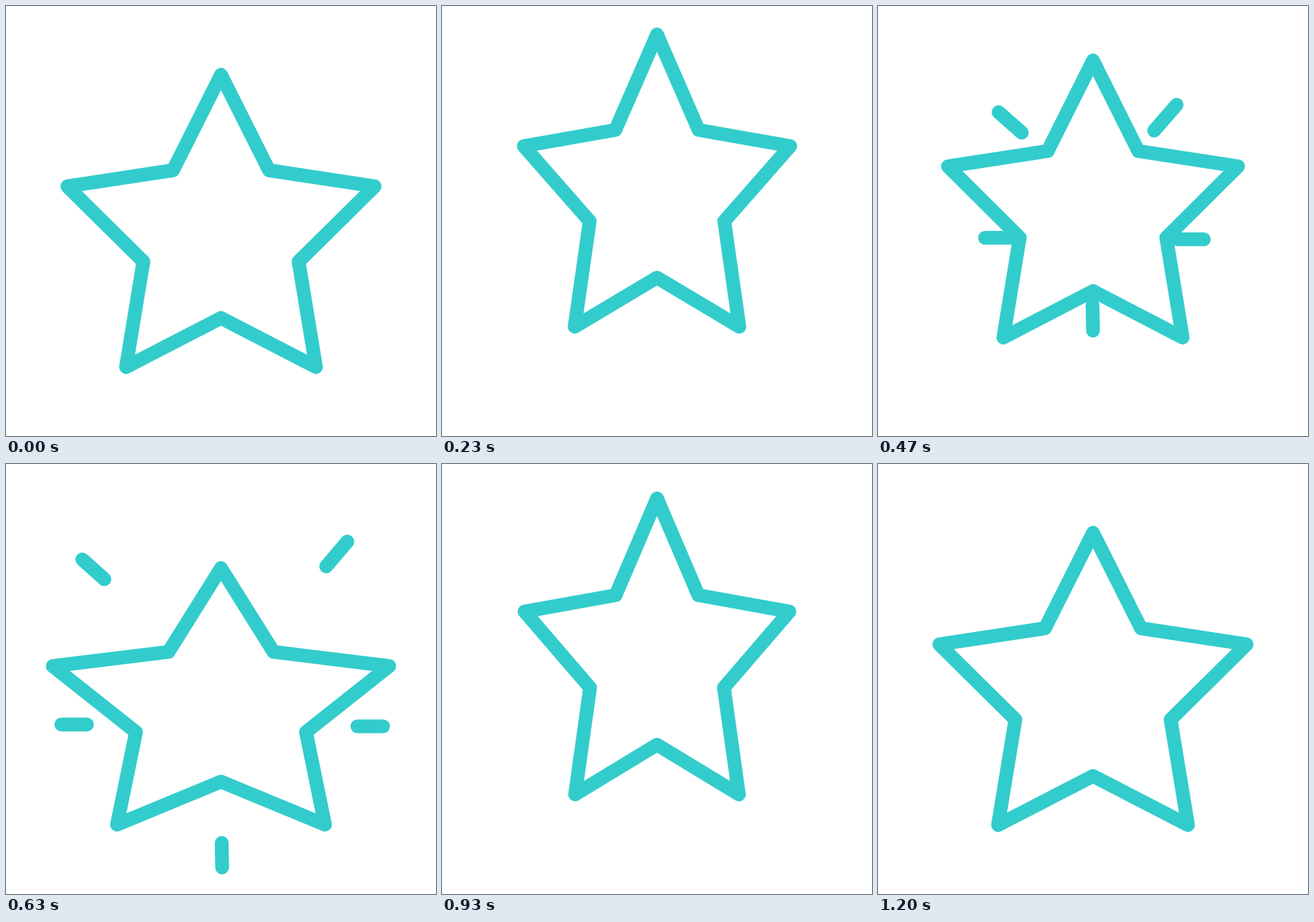
An HTML page with a canvas that plays this animation: 640x640 px, repeating every 1.57 s.

```html
<!DOCTYPE html>
<html lang="en">
<head>
<meta charset="utf-8">
<title>Jumping star</title>
<style>
  html, body { margin: 0; width: 100%; height: 100%; overflow: hidden; background: #fff; }
  canvas { display: block; width: 100vw; height: 100vh; object-fit: contain; }
</style>
</head>
<body>
<canvas id="stage" width="640" height="640"></canvas>
<script>
const ctx = document.getElementById('stage').getContext('2d');
const LOOP = 1570, FRAME = 100 / 3, LAST = 36;
const OUTER = 240.5, INNER = 121.5;

// Star poses: the ease leads into each pose from the one before.
const poses = [
  { at: 0, y: 342.8, sx: 1, sy: 1 },
  { at: 10, y: 266.8, sx: 0.8316, sy: 1, ease: [0.23, 0.7] },
  { at: 19, y: 366, sx: 1.095, sy: 0.878, ease: [0.25, 0.75] },
  { at: 28, y: 294.8, sx: 0.862, sy: 1.0125, ease: [0.25, 0.75] },
  { at: 36, y: 342.8, sx: 1, sy: 1, ease: [0.25, 0.75] }
];

// Sparks: start line and end line, each x1, y1, x2, y2.
const SPARK_FROM = 10, SPARK_TO = 19;
const sparks = [
  [[228.5, 169.9, 264.1, 201.1], [113.5, 142, 146.5, 171.5]],
  [[362.4, 210, 397.4, 170.4], [476.5, 152.5, 508, 115.5]],
  [[216.4, 313.2, 258, 313.2], [82.3, 387.8, 120.5, 387.8]],
  [[388.9, 315.3, 428.4, 315.3], [523, 390.4, 561.3, 390.4]],
  [[318, 356.7, 318.7, 395.8], [321, 564, 321.7, 600.5]]
];

const mix = (a, b, k) => a + (b - a) * k;

// Cubic bezier easing with handles (x1, 0) and (x2, 1), solved by bisection.
function ease(u, [x1, x2]) {
  let low = 0, high = 1, s = u;
  for (let i = 0; i < 24; i++) {
    s = (low + high) / 2;
    const r = 1 - s;
    const x = 3 * r * r * s * x1 + 3 * r * s * s * x2 + s * s * s;
    if (x < u) low = s; else high = s;
  }
  return s * s * (3 - 2 * s);
}

function poseAt(frame) {
  const i = Math.max(1, poses.findIndex(p => p.at >= frame));
  const a = poses[i - 1], b = poses[i];
  const k = ease((frame - a.at) / (b.at - a.at), b.ease);
  return { y: mix(a.y, b.y, k), sx: mix(a.sx, b.sx, k), sy: mix(a.sy, b.sy, k) };
}

function drawSparks(frame) {
  if (frame <= SPARK_FROM || frame > SPARK_TO) return;
  const k = ease((frame - SPARK_FROM) / (SPARK_TO - SPARK_FROM), [0.25, 0.75]);
  for (const [from, to] of sparks) {
    const [x1, y1, x2, y2] = from.map((v, i) => mix(v, to[i], k));
    ctx.beginPath();
    ctx.moveTo(x1, y1);
    ctx.lineTo(x2, y2);
    ctx.stroke();
  }
}

function drawStar({ y, sx, sy }) {
  ctx.beginPath();
  for (let i = 0; i < 10; i++) {
    const r = i % 2 ? INNER : OUTER;
    const a = i * Math.PI / 5;
    ctx.lineTo(320 + r * Math.sin(a) * sx, y - r * Math.cos(a) * sy);
  }
  ctx.closePath();
  ctx.fill();
  ctx.stroke();
}

function draw(now) {
  const frame = Math.min(LAST, Math.floor((now % LOOP + 3.4) / FRAME));
  ctx.fillStyle = '#fff';
  ctx.fillRect(0, 0, 640, 640);
  ctx.strokeStyle = '#33cccc';
  ctx.lineWidth = 20.5;
  ctx.lineCap = ctx.lineJoin = 'round';
  drawSparks(frame);
  drawStar(poseAt(frame));
}

let start;
function tick(now) {
  start ??= now;
  draw(now - start);
  requestAnimationFrame(tick);
}
draw(0);
requestAnimationFrame(tick);
</script>
</body>
</html>
```
